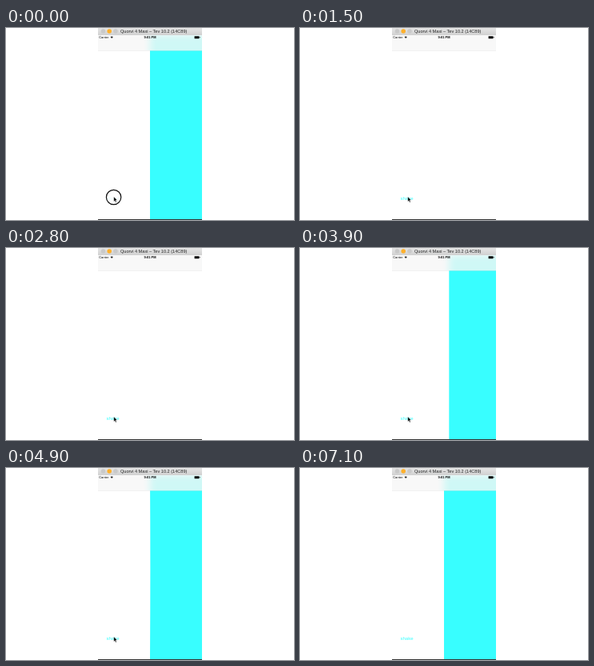
Animation, 360 px wide and 240 px high, one loop 7.2 s. Source, as an HTML page:

```html
<!DOCTYPE html>
<html>
<head>
<meta charset="utf-8">
<style>
  html, body { margin: 0; height: 100%; overflow: hidden; background: #fff; }
  svg { display: block; width: 100vw; height: 100vh; }
  text { font-family: "Liberation Sans", Arial, sans-serif; }
</style>
</head>
<body>
<svg viewBox="0 0 360 240">
  <defs>
    <linearGradient id="chrome" x2="0" y2="1">
      <stop stop-color="#e6e6e6"/><stop offset="1" stop-color="#d0d0d0"/>
    </linearGradient>
    <filter id="blur" x="-20%" width="140%" y="-5%" height="110%"><feGaussianBlur stdDeviation="4"/></filter>
    <clipPath id="screen"><rect x="115" y="9" width="130" height="230"/></clipPath>
    <clipPath id="bar"><rect x="115" y="9" width="130" height="19"/></clipPath>
  </defs>

  <text id="label" x="133.5" y="214.7" font-size="6" text-anchor="middle" fill="#38feff">shake</text>

  <g clip-path="url(#screen)"><path id="menu" fill="#38feff"/></g>
  <rect x="115" y="9" width="130" height="19" fill="#f8f8f8"/>
  <g clip-path="url(#bar)"><path id="glow" fill="#cff8f6" filter="url(#blur)"/></g>
  <rect x="115" y="28" width="130" height=".4" fill="#ddd"/>

  <rect x="115" width="130" height="9" fill="url(#chrome)"/>
  <circle cx="121.5" cy="4" r="2.8" fill="#c9c9c9"/>
  <circle cx="129.2" cy="4" r="2.8" fill="#fdb02c"/>
  <circle cx="137" cy="4" r="2.8" fill="#c9c9c9"/>
  <text x="184.7" y="6" font-size="5.6" text-anchor="middle" fill="#222">Quorvi 4 Maxi – Tev 10.2 (14C89)</text>

  <text x="116.2" y="13.2" font-size="4">Carrier</text>
  <path d="M130.5 11Q132.2 9.8 133.9 11L132.2 13.1Z" fill="#222"/>
  <text x="180" y="13.2" font-size="4" font-weight="bold" text-anchor="middle">9:01 PM</text>
  <path d="M235.6 10.2h5.8v3h-5.8zM241.8 11.1h.7v1.2h-.7z"/>
  <rect x="115" y="239" width="130" height="1" fill="#333"/>

  <circle id="ring" cx="134.6" cy="211.5" r="9.2" fill="none" stroke="#111" stroke-width="1.2"/>
  <path id="cursor" d="M134.8 210.9v6l1.3-1.2 1 2.3 1-.4-1-2.3h1.8z" fill="#000" stroke="#fff" stroke-width=".3"/>
</svg>
<script>
const LOOP = 7200, STEP = 100, OPEN = 180, HIDDEN = 261, TOP = 9, BOTTOM = 240;
// menu toggles: [time, opens]
const toggles = [[0, 0], [690, 1], [1300, 0], [1790, 1], [2600, 0], [3000, 1],
                 [3855, 0], [4300, 1], [5100, 0], [5440, 1]];
// finger down: [from, to]
const presses = [[0, 100], [600, 700], [1200, 1300], [1700, 1800], [2500, 2600], [2900, 3000],
                 [3700, 3800], [4100, 4300], [5000, 5100], [5300, 5400]];

const el = id => document.getElementById(id);
const ease = u => (1 - Math.cos(Math.PI * Math.min(u, 1))) / 2;
const mix = (a, b, k) => a + (b - a) * k;

function menuAt(t) {
  const [start, opens] = toggles.filter(g => g[0] <= t).pop();
  const age = t - start;
  if (!opens) return { x: mix(OPEN, HIDDEN, ease(age / 250)), bulge: 0 };
  const u = Math.min(age / 700, 1);
  return {
    x: mix(HIDDEN, OPEN, ease(age / 300)),
    bulge: 24 * (1 - u) ** 2 * Math.sin(2 * Math.PI * u)
  };
}

function draw(now) {
  const t = Math.floor(now % LOOP / STEP) * STEP;
  const { x, bulge } = menuAt(t);
  const d = `M${x} ${TOP}Q${x - 2 * bulge} ${(TOP + BOTTOM) / 2} ${x} ${BOTTOM}H300V${TOP}Z`;
  el("menu").setAttribute("d", d);
  el("glow").setAttribute("d", d);
  const down = presses.some(([a, b]) => t >= a && t < b);
  el("ring").style.opacity = down ? 1 : 0;
  el("label").style.opacity = down ? 0.1 : 1;
  el("cursor").style.opacity = t < 6100 ? 1 : 0;
}

const begin = performance.now();
function tick() {
  draw(performance.now() - begin);
  requestAnimationFrame(tick);
}
tick();
</script>
</body>
</html>
```
